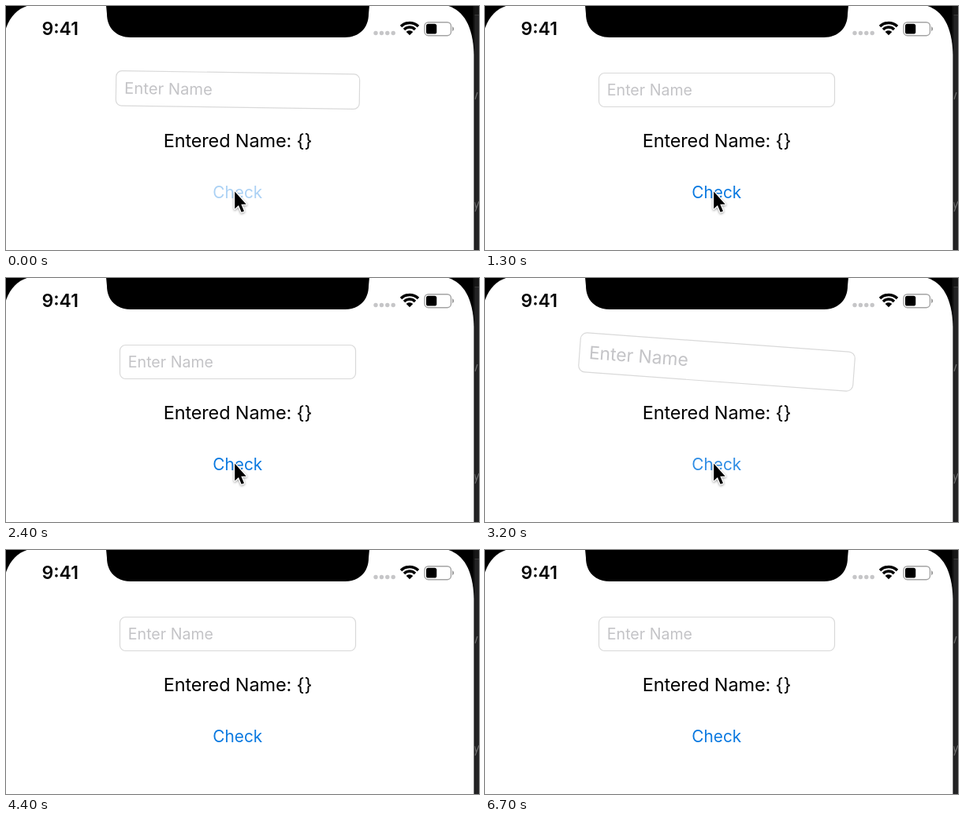
Recreate the animation shown at these times as an HTML page. Size 600x311 px, loop 7000 ms.

```html
<!DOCTYPE html>
<html lang="en">
<head>
<meta charset="utf-8">
<title>Name check</title>
<style>
  html, body { margin: 0; width: 100%; height: 100%; overflow: hidden; background: #000; }
  svg { display: block; width: 600px; height: 311px; }
  text { font-family: Inter, "Liberation Sans", sans-serif; }
  .mid { text-anchor: middle; }
  .clock { font-size: 23px; font-weight: 600; fill: #050505; }
  .hint { font-size: 19.6px; fill: #c4c4c7; }
  .label { font-size: 23.5px; letter-spacing: -.15px; fill: #000; }
  .button { font-size: 20.8px; fill: #0a79e0; }
  .box { fill: #fff; stroke: #d9d9d9; stroke-width: 1.2; vector-effect: non-scaling-stroke; }
  .pointer { fill: #000; stroke: #fff; stroke-width: 2.6; stroke-linejoin: round; paint-order: stroke;
    filter: drop-shadow(0 1px 1.5px rgba(0, 0, 0, .4)); }
</style>
</head>
<body>
<svg viewBox="0 0 600 311">
  <!-- editor behind the phone -->
  <rect x="592" width="8" height="311" fill="#232324"/>
  <rect x="592" width="8" height="11" fill="#171717"/>
  <path d="M594 11.5H600" stroke="#3a3a3b"/>
  <path d="M598 110l-3 9M594.500 250l2 8M600 249l-5 13" fill="none" stroke="#6d6d6d" stroke-width="1.3"/>

  <!-- phone screen and notch -->
  <path d="M0 0H593V62H0Z" fill="#000"/>
  <path d="M593.500 0V311" stroke="#111" stroke-width="2"/>
  <path d="M30 -1H558C578 4 592.500 22 593.500 62V311H-5.500V62C-4.500 22 10 4 30 -1Z" fill="#fff"/>
  <path d="M127 -1L128 10C128 28 140 40 158 40H430C448 40 460 28 460 10L461 -1Z" fill="#000"/>

  <!-- status bar -->
  <text class="clock" x="45.500" y="37">9:41</text>
  <g fill="#c6c6c8">
    <circle cx="469" cy="34.500" r="2.700"/>
    <circle cx="476.400" cy="34.500" r="2.700"/>
    <circle cx="483.800" cy="34.500" r="2.700"/>
    <circle cx="491.200" cy="34.500" r="2.700"/>
  </g>
  <g transform="translate(0 -.5)">
    <g fill="none" stroke="#000" stroke-width="3.500">
      <path d="M501 26.500A15.600 15.600 0 0 1 523 26.500"/>
      <path d="M505 30.500A9.900 9.900 0 0 1 519 30.500"/>
    </g>
    <path d="M512 37.800L507.700 33.500A6.100 6.100 0 0 1 516.300 33.500Z"/>
  </g>
  <rect x="531" y="20.700" width="33.500" height="17" rx="4.800" fill="none" stroke="#a3a3a3" stroke-width="1.400"/>
  <rect x="533" y="22.800" width="13.300" height="12.800" rx="2.600"/>
  <path d="M566.300 26Q570 29.200 566.300 32.400Z" fill="#8c8c8c"/>

  <!-- form -->
  <g id="field">
    <rect class="box" x="144.500" y="85.500" width="299" height="43" rx="7"/>
    <text class="hint" x="154.800" y="113.700">Enter Name</text>
  </g>
  <text class="label mid" x="294" y="180">Entered Name: {}</text>
  <text class="button mid" id="button" x="293.800" y="245.300">Check</text>
  <path class="pointer" id="pointer" d="M290.200 236.500V258.500L295 254L298.700 262.800L302 261.400L298.300 252.700H304.700Z"/>
</svg>
<script>
  const LOOP = 7000, STEP = 100;
  const SHAKE = 600, FADE = 470;
  const TAPS = [-80, 1450, 2820];
  const POINTER_GONE = 4000;

  const [field, button, pointer] =
    ['field', 'button', 'pointer'].map(id => document.getElementById(id));

  function draw(t) {
    const age = t - TAPS.filter(tap => tap <= t).pop();

    // grow and tilt, then return
    const p = age < SHAKE ? Math.sin(Math.PI * age / SHAKE) ** 2 : 0;
    field.setAttribute('transform',
      `translate(294 107) rotate(${5 * p}) scale(${1 + .2 * p}) translate(-294 -107)`);

    button.setAttribute('opacity', .2 + .8 * Math.min(1, age / FADE));
    pointer.setAttribute('visibility', t < POINTER_GONE ? 'visible' : 'hidden');
  }

  const start = performance.now();
  function tick() {
    const t = (performance.now() - start) % LOOP;
    draw(Math.floor(t / STEP) * STEP);
    requestAnimationFrame(tick);
  }
  tick();
</script>
</body>
</html>
```
